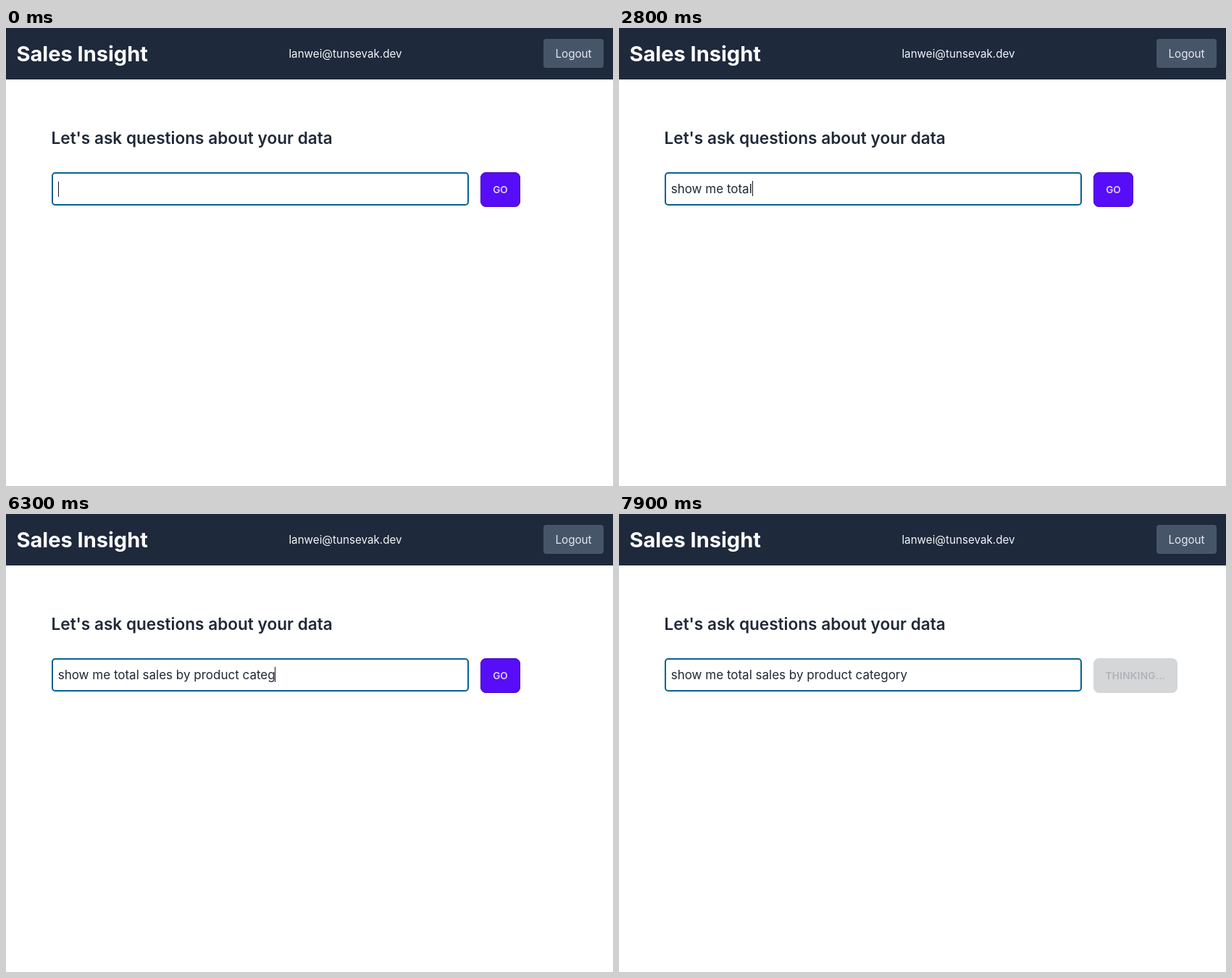
Animation, 838 px wide and 632 px high, one loop 8 s. Source, as an HTML page:

```html
<!DOCTYPE html>
<html lang="en">
<head>
<meta charset="utf-8">
<title>Sales Insight</title>
<style>
  html, body { margin: 0; width: 100%; height: 100%; overflow: hidden; background: #fff; }
  svg { display: block; width: 100%; height: 100%; }
  text { font-family: Inter, "Liberation Sans", sans-serif; white-space: pre; }
</style>
</head>
<body>
<svg viewBox="0 0 838 632">
  <rect width="838" height="632" fill="#fff"/>
  <rect width="838" height="71" fill="#1e293b"/>
  <text x="14.5" y="46" font-size="29" font-weight="700" fill="#fff">Sales Insight</text>
  <text x="468.5" y="41" font-size="15.2" text-anchor="middle" fill="#f1f5f9">lanwei@tunsevak.dev</text>
  <rect x="742" y="15" width="83" height="40" rx="4" fill="#475569"/>
  <text x="783.5" y="41" font-size="15.2" text-anchor="middle" fill="#e2e8f0">Logout</text>

  <text x="62.5" y="160" font-size="22.6" font-weight="600" fill="#1f2937">Let's ask questions about your data</text>
  <rect x="64" y="200" width="574" height="44" rx="4" fill="#fff" stroke="#08618f" stroke-width="2"/>
  <text id="query" x="71.7" y="228" font-size="17" fill="#1f2937"></text>
  <rect id="caret" width="1" height="21" fill="#111827"/>

  <rect id="button" x="655" y="199" height="48" rx="8"/>
  <rect id="edge" x="655.5" y="199.5" height="47" rx="7.5" fill="none" stroke="#460cbe"/>
  <text id="label" y="228" font-size="13.6" font-weight="600" text-anchor="middle"></text>
</svg>
<script>
const LOOP = 8000, STEP = 100, SUBMIT = 7300;
const $ = id => document.getElementById(id);
const query = $('query'), caret = $('caret'), button = $('button'), edge = $('edge'), label = $('label');

// Typing bursts: start time, then what each 100 ms step adds
const bursts = [
  [1400, 's|h|o|w| |m|e'], [2200, ' '], [2400, 't|o|t'], [2800, 'al'], [3000, ' '],
  [3200, 's'], [3400, 'a|l|e|s| '], [4000, 'b|y '], [4300, 'p|r|o|d'], [4800, 'uc'],
  [5000, 't| '], [5300, 'c|a'], [6000, 't|e'], [6300, 'g|o|r|y']
].map(([at, keys]) => [at, keys.split('|')]);

// Spans in which the caret is blinked off
const hidden = [[400, 900], [5900, 6000], [7100, 7400], [7900, 8000]];

const typed = t => bursts.map(([at, keys]) =>
  keys.filter((_, i) => t >= at + i * STEP).join('')).join('');
const mix = (a, b, p) => a.map((v, i) => v + (b[i] - v) * p);
const rgba = (c, a = 1) => `rgba(${c.map(Math.round).join()},${a})`;
const set = (el, attrs) => { for (const k in attrs) el.setAttribute(k, attrs[k]); };

// Fade of the button into its disabled state, sampled every step
function fade(t) {
  if (t < SUBMIT) return 0;
  const n = Math.floor((t - SUBMIT) / STEP) + 1;
  return n > 2 ? 1 : 1 - 0.31 ** n;
}

function drawQuery(t) {
  const text = typed(t);
  if (query.textContent !== text) query.textContent = text;
  const width = text ? query.getComputedTextLength() : 0;
  set(caret, {
    x: Math.floor(72 + width),
    y: text ? 211 : 212,
    visibility: hidden.some(([a, b]) => t >= a && t < b) ? 'hidden' : 'visible'
  });
}

function drawButton(t) {
  const p = fade(t), busy = t >= SUBMIT, width = busy ? 116 : 55;
  set(button, { width, fill: rgba(mix([87, 13, 248], [212, 214, 216], p)) });
  set(edge, { width: width - 1, 'stroke-opacity': 1 - p });
  // Premultiplied blend towards a 20% dark label
  const alpha = 1 - 0.8 * p;
  const ink = mix([224, 210, 254], [6.2, 8.2, 11], p).map(v => v / alpha);
  set(label, { x: 655 + width / 2, fill: rgba(ink, alpha), 'letter-spacing': busy ? 0.25 : 0 });
  const word = busy ? 'THINKING...' : 'GO';
  if (label.textContent !== word) label.textContent = word;
}

function render(t) {
  drawQuery(t);
  drawButton(t);
}

const start = performance.now();
function tick(now) {
  render(Math.max(0, now - start) % LOOP);
  requestAnimationFrame(tick);
}
render(0);
requestAnimationFrame(tick);
</script>
</body>
</html>
```
